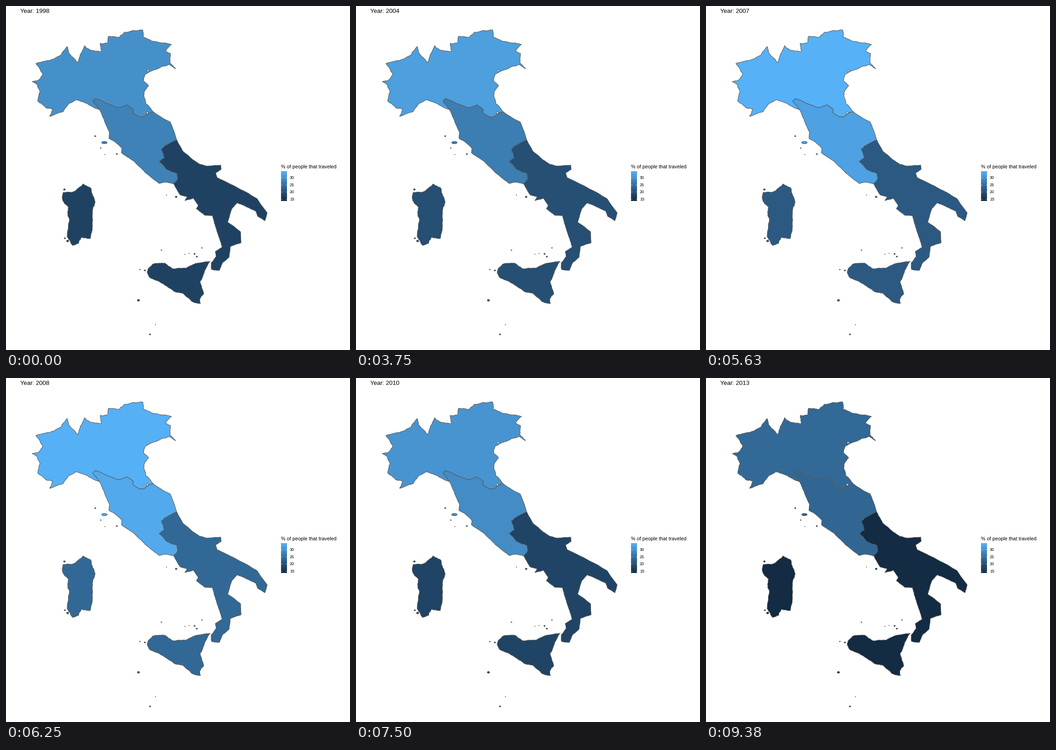
A matplotlib script for the animation above (10000 ms loop, 748 by 748 pixels).

```python
import numpy as np
import matplotlib.pyplot as plt
from matplotlib.animation import FuncAnimation
from matplotlib.colors import LinearSegmentedColormap
from matplotlib.patches import Ellipse, Polygon

SIZE, DPI = 748, 100
PX = 72 / DPI
FIRST_YEAR, YEARS, LOOP_MS = 1998, 16, 10000
OUTLINE = "#595959"

plt.rcParams["font.family"] = "Liberation Sans"
rng = np.random.default_rng(7)
blues = LinearSegmentedColormap.from_list("blues", ["#132B43", "#336A98", "#56B1F7"])

# Colour scale positions at turning points; years between are interpolated.
KEY_YEARS = [1998, 2004, 2005, 2007, 2008, 2009, 2011, 2013]
LEVELS = {
    "north": [.765, .87, 1, 1, .995, .88, .71, .49],
    "center": [.67, .635, .84, .89, .94, .86, .62, .465],
    "south": [.18, .285, .355, .37, .485, .32, .08, 0],
}


def coast(*points, rough=.28, depth=3):
    """Join key points by seeded midpoint displacement."""
    line = np.array(points, float)
    for _ in range(depth):
        step = np.diff(line, axis=0)
        length = np.hypot(*step.T)[:, None]
        normal = np.column_stack([-step[:, 1], step[:, 0]]) / length
        offset = rough * np.sqrt(length) * rng.uniform(-1, 1, length.shape)
        finer = np.empty((2 * len(line) - 1, 2))
        finer[::2] = line
        finer[1::2] = (line[:-1] + line[1:]) / 2 + normal * offset
        line = finer
    return line


def label(x, y, text, px):
    return ax.text(x, y, text, fontsize=px * PX, va="baseline", color="black")


def add_shape(shape, region):
    shape.set(edgecolor=OUTLINE, linewidth=1.07 * PX, joinstyle="round")
    ax.add_patch(shape)
    regions[region].append(shape)


fig = plt.figure(figsize=(SIZE / DPI, SIZE / DPI), dpi=DPI, facecolor="white")
ax = fig.add_axes([0, 0, 1, 1])
ax.axis("off")

alps = coast(
    (95, 240), (102, 224), (88, 222), (69, 207), (74, 187), (68, 171), (57, 165),
    (70, 162), (80, 148), (65, 125), (104, 115), (119, 107), (133, 88), (136, 101),
    (156, 123), (161, 107), (171, 86), (183, 96), (207, 99), (205, 81), (221, 80),
    (223, 66), (246, 68), (257, 57), (297, 52), (298, 68), (322, 77), (360, 84),
    (347, 98), (358, 104), (356, 123))
north_adriatic = coast(
    (356, 123), (369, 136), (355, 127), (338, 132), (303, 148), (299, 162),
    (310, 174), (300, 188), (304, 212), (320, 230))
liguria = coast((204, 226), (195, 223), (176, 212), (152, 204), (137, 212),
                (124, 230), (95, 240), rough=.18)
north_border = coast(
    (320, 230), (310, 233), (300, 241), (290, 241), (275, 231), (277, 226),
    (264, 215), (243, 221), (219, 212), (195, 201), (189, 207), (204, 226), rough=.2)
marche = coast((320, 230), (341, 244), (357, 252), (364, 269), (371, 291), rough=.08)
south_border = coast(
    (371, 291), (350, 302), (338, 311), (344, 331), (333, 338), (348, 354),
    (372, 364), (373, 377), (365, 387))
tyrrhenian = coast(
    (365, 387), (345, 383), (333, 386), (315, 372), (298, 357), (279, 338),
    (251, 319), (252, 310), (235, 294), (224, 288), (225, 274), (214, 250),
    (204, 226), rough=.15)
apulia = coast(
    (371, 291), (384, 315), (406, 334), (421, 344), (436, 348), (467, 346),
    (468, 355), (456, 363), (459, 373), (517, 402), (546, 419), (568, 450),
    (563, 467), (547, 457), (543, 446), (513, 432), (503, 428), (491, 441),
    (482, 470), rough=.1)
calabria = coast(
    (482, 470), (491, 476), (510, 491), (511, 515), (488, 523), (485, 546),
    (471, 558), (464, 575), (447, 573), (446, 559), (457, 545), (455, 534),
    (470, 524), (464, 505), (453, 472), (449, 456), (432, 455), (414, 441),
    (418, 433), (407, 418), (389, 423), (394, 415), (379, 411), (365, 387), rough=.13)
sicily = coast(
    (307, 580), (310, 570), (320, 561), (345, 559), (362, 571), (392, 570),
    (407, 562), (444, 555), (431, 580), (422, 600), (430, 626), (421, 637),
    (423, 647), (405, 643), (385, 625), (366, 621), (333, 599), (313, 591),
    (307, 580), rough=.2)
sardinia = coast(
    (122, 414), (125, 405), (146, 404), (167, 387), (185, 397), (194, 427),
    (189, 440), (188, 480), (183, 506), (164, 503), (158, 516), (144, 520),
    (133, 502), (138, 463), (134, 455), (136, 437), (124, 424), (122, 414))

regions = {name: [] for name in LEVELS}
for name, *parts in [
        ("north", alps, north_adriatic, north_border, liguria),
        ("center", marche, south_border, tyrrhenian, north_border[::-1]),
        ("south", apulia, calabria, south_border[::-1]),
        ("south", sicily), ("south", sardinia)]:
    add_shape(Polygon(np.vstack(parts), closed=True), name)

# Small islands: x, y, width.
ISLANDS = {
    "center": [(214, 297, 12), (194, 283, 3), (206, 309, 2), (215, 323, 1),
               (241, 322, 3), (349, 411, 1)],
    "south": [(370, 415, 4), (134, 511, 5), (128, 505, 3), (127, 399, 4),
              (288, 640, 5), (313, 714, 3), (325, 693, 1), (302, 575, 3),
              (291, 573, 2), (338, 531, 2), (426, 526, 2), (389, 540, 1),
              (398, 538, 1), (410, 539, 3), (415, 545, 3)],
}
for name, islands in ISLANDS.items():
    for x, y, width in islands:
        add_shape(Ellipse((x, y), width, min(.8 * width, 5)), name)

# Lagoon and enclave
for x, y in ((309, 140.5), (307.5, 232)):
    ax.add_patch(Ellipse((x, y), 4, 4, fc="white", ec=OUTLINE, lw=PX))

# Legend
ax.imshow(np.linspace(1, 0, 256)[:, None], cmap=blues, aspect="auto",
          extent=(598, 611, 424, 359), interpolation="bilinear")
label(598, 352.6, "% of people that traveled", 10.8)
for value in range(15, 31, 5):
    y = 419.6 - (value - 15) * 3.1
    for x in (598, 608.4):
        ax.plot([x, x + 2.6], [y, y], color="white", lw=.55 * PX,
                solid_capstyle="butt")
    label(617, y + 3.2, str(value), 9)

title = label(30.7, 15, "", 13.2)
ax.set(xlim=(0, SIZE), ylim=(SIZE, 0))


def draw(frame):
    year = FIRST_YEAR + frame
    title.set_text(f"Year: {year}")
    for name, shapes in regions.items():
        color = blues(float(np.interp(year, KEY_YEARS, LEVELS[name])))
        for shape in shapes:
            shape.set_facecolor(color)
    return [title, *sum(regions.values(), [])]


anim = FuncAnimation(fig, draw, frames=YEARS, interval=LOOP_MS / YEARS,
                     repeat=True, repeat_delay=0, blit=False)
plt.show()
```
